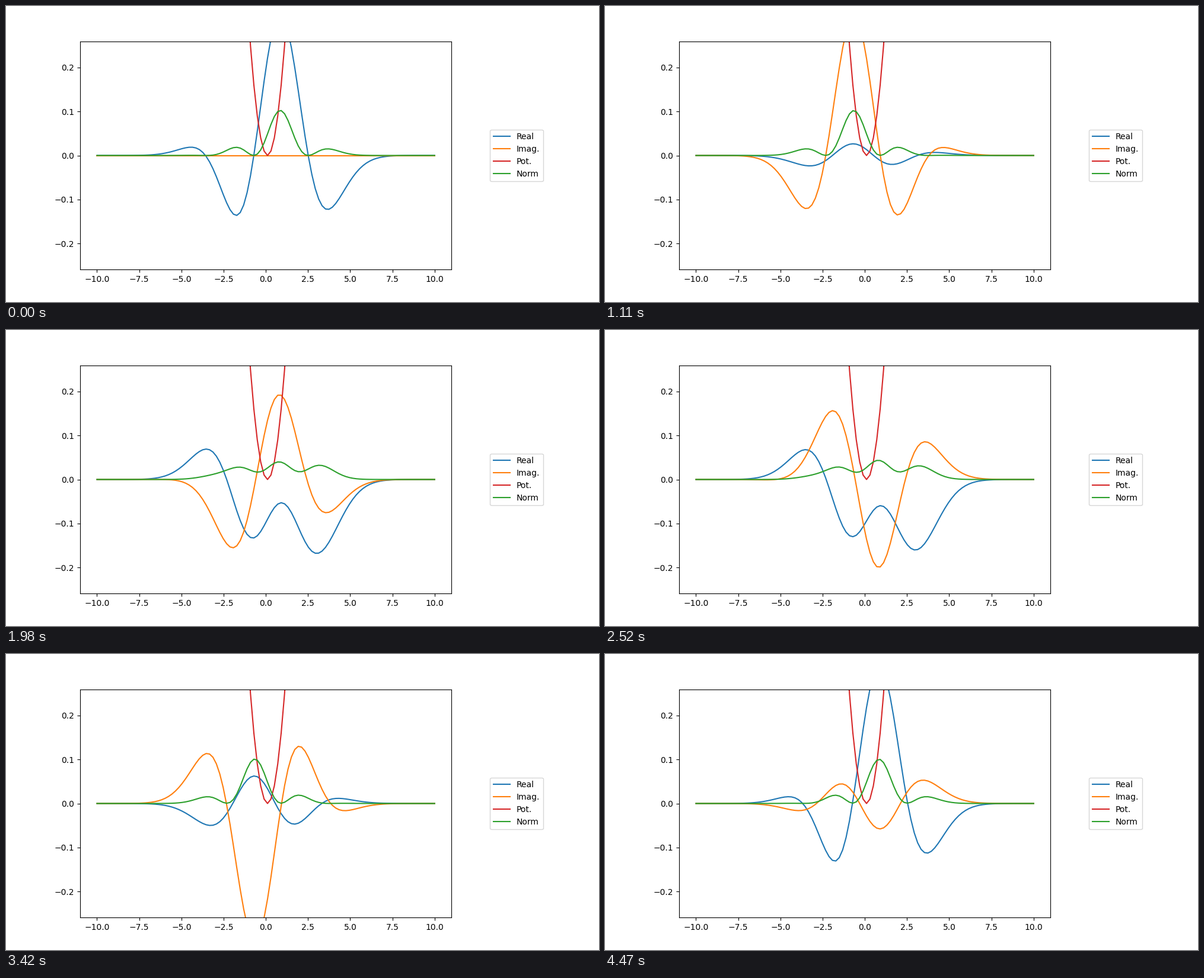
Recreate the animation shown at these times as a matplotlib script. Size 1000 px wide and 500 px high, loop 4.5 s.

```python
import numpy as np
import matplotlib.pyplot as plt
from matplotlib.animation import FuncAnimation

FRAMES = 150
POINTS = 100
DX = 0.1

plt.rcParams["font.family"] = "DejaVu Sans"

# Discretised harmonic oscillator: H = -1/2 d²/dx² + x²
x = (np.arange(POINTS) - POINTS // 2) * DX
potential = x**2
hop = np.full(POINTS - 1, -0.5 / DX**2)
hamiltonian = np.diag(1 / DX**2 + potential) + np.diag(hop, 1) + np.diag(hop, -1)
energies, states = np.linalg.eigh(hamiltonian)
energies, states = energies[:4], states[:, :4]
states = states * np.sign(states[70])  # positive right-hand tails

weights = np.array([1, 1, -1, -1]) / 2
period = 2 * np.pi / energies[0]


def wave(frame):
    t = period * frame / FRAMES
    return states @ (weights * np.exp(1j * energies * t))


fig, (ax, side) = plt.subplots(
    1, 2, figsize=(10, 5), dpi=100, gridspec_kw={"width_ratios": [8, 1]}
)
grid = np.linspace(-10, 10, POINTS)
psi = wave(0)
real_line, = ax.plot(grid, psi.real, color="C0", label="Real")
imag_line, = ax.plot(grid, psi.imag, color="C1", label="Imag.")
pot_line, = ax.plot(grid, potential, color="C3", label="Pot.")
norm_line, = ax.plot(grid, np.abs(psi) ** 2, color="C2", label="Norm")

limit = np.abs(states[:, 0]).max()
ax.set_ylim(-limit, limit)
side.axis("off")
side.legend(handles=[real_line, imag_line, pot_line, norm_line], loc="center")


def update(frame):
    psi = wave(frame)
    real_line.set_ydata(psi.real)
    imag_line.set_ydata(psi.imag)
    norm_line.set_ydata(np.abs(psi) ** 2)
    return real_line, imag_line, norm_line


anim = FuncAnimation(fig, update, frames=FRAMES, interval=30, repeat=True)
plt.show()
```
